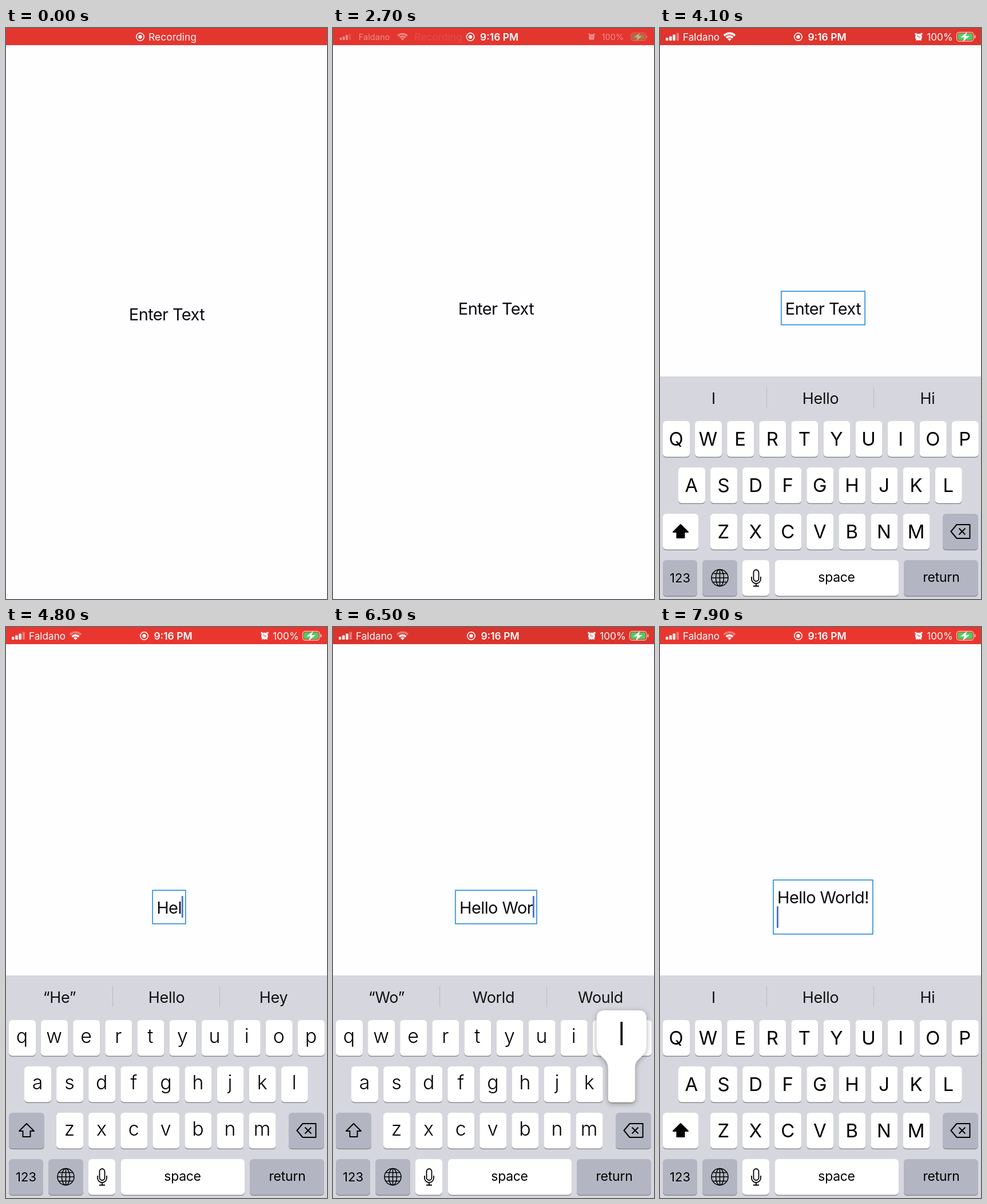
These frames come from a looping animation (561x998 px, 8 s). An HTML page with a canvas:

```html
<!DOCTYPE html>
<html lang="en">
<head>
<meta charset="utf-8">
<title>Text entry on a phone</title>
<style>
html, body { margin: 0; width: 100%; height: 100%; overflow: hidden; background: #fefdff; }
canvas { display: block; }
</style>
</head>
<body>
<canvas id="stage" width="561" height="998"></canvas>
<script>
const g = document.getElementById('stage').getContext('2d');
const LOOP = 8000, FAMILY = 'Inter, Roboto, sans-serif';
const GREY = '#b3b6c2';
const clamp = v => Math.max(0, Math.min(1, v));

// Drag path of the label: time, centre x, centre y
const path = [
  [200, 281, 500], [450, 300, 330], [650, 250, 200], [850, 130, 260],
  [1000, 90, 420], [1200, 150, 680], [1400, 363, 850], [1600, 345, 894],
  [1700, 316, 886], [1800, 305, 806], [2100, 290, 560], [2350, 285, 490]
];

// Key presses: time, key
const presses = [
  [4300, 'H'], [4500, 'e'], [4680, 'l'], [4830, 'l'], [4980, 'o'], [5120, ' '],
  [5750, 'W'], [6100, 'o'], [6280, 'r'], [6460, 'l'], [6660, 'd'],
  [7000, '123'], [7300, '!'], [7600, '\n']
];
const HOLD = 110, HINT_LAG = 150;
const KEYBOARD_AT = 3300;

const letters = ['qwertyuiop', 'asdfghjkl', 'zxcvbnm'];
const symbols = ['1234567890', '-/:;()$&@"', ".,?!'"];

function label(str, x, y, size, { align = 'center', weight = 400, spacing = 0, color = '#000' } = {}) {
  g.font = `${weight} ${size}px ${FAMILY}`;
  g.letterSpacing = spacing + 'px';
  g.textAlign = align;
  g.fillStyle = color;
  g.fillText(str, x, y);
  g.letterSpacing = '0px';
}

function line(points, close) {
  g.beginPath();
  points.forEach(([x, y]) => g.lineTo(x, y));
  if (close) g.closePath();
}

function circle(x, y, r) {
  g.beginPath();
  g.arc(x, y, r, 0, 7);
}

function box(x, y, w, h, r, color) {
  g.fillStyle = color;
  g.beginPath();
  g.roundRect(x, y, w, h, r);
  g.fill();
}

function pathAt(t) {
  const last = path.length - 1;
  if (t <= path[0][0]) return path[0].slice(1);
  if (t >= path[last][0]) return path[last].slice(1);
  const i = path.findIndex(p => p[0] > t) - 1;
  const slope = (k, a) => {
    if (k === 0 || k === last) return 0;
    const p = path[k - 1], q = path[k + 1];
    return (q[a] - p[a]) / (q[0] - p[0]);
  };
  const p = path[i], q = path[i + 1], d = q[0] - p[0], u = (t - p[0]) / d;
  return [1, 2].map(a => {
    const m = slope(i, a) * d, n = slope(i + 1, a) * d;
    return p[a] + u * (m + u * (3 * (q[a] - p[a]) - 2 * m - n + u * (2 * (p[a] - q[a]) + m + n)));
  });
}

function typedAt(t) {
  return presses.filter(([at, key]) => at + HOLD <= t && key !== '123').map(p => p[1]).join('');
}

function hints(typed) {
  if (!typed || /[!\n]$/.test(typed)) return ['I', 'Hello', 'Hi'];
  if (typed.endsWith(' ')) return ['Hello', 'Hi', 'There'];
  const word = typed.split(' ').pop();
  return [`“${word}”`, ...(word[0] === 'H' ? ['Hello', 'Hey'] : ['World', 'Would'])];
}

// Status bar
function recordMark(x) {
  g.strokeStyle = g.fillStyle = '#fff';
  g.lineWidth = 1.6;
  circle(x, 15.5, 6.7);
  g.stroke();
  circle(x, 15.5, 3.2);
  g.fill();
}

function signal() {
  [5, 7.5, 10.5, 13.5].forEach((h, i) =>
    box(10 + i * 6.2, 22 - h, 4.4, h, 1, i < 3 ? '#fff' : '#fff5'));
}

function wifi(weak) {
  [[15.3, 11.6], [10, 6.4], [4.8, 0]].forEach(([outer, inner], i) => {
    g.fillStyle = weak && i === 0 ? '#fff5' : '#fff';
    g.beginPath();
    g.arc(121.5, 22.8, outer, -2.36, -0.78);
    g.arc(121.5, 22.8, inner, -0.78, -2.36, true);
    g.fill();
  });
}

function alarm() {
  g.fillStyle = g.strokeStyle = '#fff';
  circle(452, 15.8, 6);
  g.fill();
  g.lineWidth = 1.6;
  [-1, 1].forEach(s => {
    circle(452 + s * 5, 10.2, 1.8);
    g.fill();
    line([[452 + s * 3, 19], [452 + s * 4.6, 21.8]]);
    g.stroke();
  });
  g.strokeStyle = '#e0372f';
  g.lineWidth = 1.1;
  line([[449.5, 13.2], [452, 16], [455, 16]]);
  g.stroke();
}

function battery() {
  g.strokeStyle = '#fffa';
  g.lineWidth = 1.3;
  g.beginPath();
  g.roundRect(518.5, 7.5, 29.5, 15.5, 4.5);
  g.stroke();
  box(549.5, 12.5, 2, 5.5, 1, '#fffa');
  box(520.5, 9.5, 25.5, 11.5, 2.5, '#46d160');
  g.fillStyle = '#fff';
  line([[537, 7], [525, 16.5], [532, 16.5], [529, 24], [541, 14], [534, 14]], true);
  g.fill();
}

function statusBar(t) {
  const glow = Math.cos((t - 5350) / 1000 * Math.PI);
  g.fillStyle = `rgb(${236 + 20 * glow}, ${55.5 + 3.5 * glow}, ${48 + 3 * glow})`;
  g.fillRect(0, 0, 561, 30);

  const u = clamp((t - 2500) / 400), p = 1 - (1 - u) ** 2.3;
  g.globalAlpha = clamp(1 - 1.76 * u);
  label('Recording', 249 - 134 * p, 22, 17.5, { align: 'left', color: '#fffffff0' });
  g.globalAlpha = 1;
  recordMark(234.5 + 7 * p);
  if (!u) return;

  g.globalAlpha = clamp(u * 2);
  label('9:16 PM', 285 + 7 * p, 22, 17.5, { weight: 600, color: '#fff' });
  const grow = (x, draw) => {
    const s = 0.25 + 0.75 * p;
    g.save();
    g.globalAlpha = u < 0.5 ? u * 0.85 : 0.425 + (u - 0.5) * 1.15;
    g.translate(x, 15.5);
    g.scale(s, s);
    g.translate(-x, -15.5);
    draw();
    g.restore();
  };
  grow(21.5, signal);
  grow(72, () => label('Faldano', 72, 22, 17.2, { color: '#fff' }));
  grow(121.5, () => wifi(t > 4700));
  grow(452, alarm);
  grow(489, () => label('100%', 489, 22, 17.2, { color: '#fff' }));
  grow(535, battery);
  g.globalAlpha = 1;
}

// Editable label
function field(t, typed) {
  const [x, y] = pathAt(t);
  const style = { align: 'left', spacing: -0.6, color: '#0c0c10' };
  const lines = (typed || 'Enter Text').split('\n');
  g.font = `400 29px ${FAMILY}`;
  g.letterSpacing = style.spacing + 'px';
  const w = g.measureText(lines[0]).width;
  const left = x - w / 2, shift = (lines.length - 1) * 18;
  label(lines[0], left, y + 11 - shift, 29, style);
  if (t < KEYBOARD_AT) return;

  g.strokeStyle = '#1484dc';
  g.lineWidth = 1.5;
  g.strokeRect(left - 7, 460.2 - shift, w + 14, 58.5 + 2 * shift);
  if (typed) box(shift ? left - 1 : left + w, 470 + shift, 2.8, 38, 1, '#456fd8');
}

// Keyboard
function key(x, y, w, color = '#fff') {
  box(x, y + 1.5, w, 62.5, 6, '#8a8b91');
  box(x, y, w, 62.5, 6, color);
}

function popup(x, w, y, ch, weight) {
  const c = x + w / 2, l = c - 43.5, r = c + 43.5, top = y - 98, bottom = y + 63;
  g.save();
  g.shadowColor = '#0005';
  g.shadowBlur = 10;
  g.shadowOffsetY = 2;
  g.fillStyle = '#fff';
  g.beginPath();
  g.moveTo(l + 12, top);
  g.arcTo(r, top, r, y - 36, 12);
  g.lineTo(r, y - 36);
  g.bezierCurveTo(r, y - 14, x + w, y - 18, x + w, y + 4);
  g.arcTo(x + w, bottom, x, bottom, 6);
  g.arcTo(x, bottom, x, y, 6);
  g.lineTo(x, y + 4);
  g.bezierCurveTo(x, y - 18, l, y - 14, l, y - 36);
  g.arcTo(l, top, r, top, 12);
  g.fill();
  g.restore();
  label(ch, c, y - 37, 56, { weight });
}

function shiftKey(caps) {
  key(5, 849, 62, caps ? '#fff' : GREY);
  g.fillStyle = g.strokeStyle = '#000';
  g.lineWidth = 2;
  g.lineJoin = 'round';
  line([[36, 868], [49, 881], [42.5, 881], [42.5, 891], [29.5, 891], [29.5, 881], [23, 881]], true);
  if (caps) g.fill();
  g.stroke();
}

function deleteKey() {
  key(494, 849, 62, GREY);
  g.strokeStyle = '#000';
  g.lineWidth = 2;
  line([[508.5, 880], [518.5, 868], [541.5, 868], [541.5, 892], [518.5, 892]], true);
  g.stroke();
  line([[522.5, 874.5], [533.5, 885.5]]);
  g.stroke();
  line([[533.5, 874.5], [522.5, 885.5]]);
  g.stroke();
}

function globe() {
  const x = 104.5, y = 961;
  g.strokeStyle = '#000';
  g.lineWidth = 1.5;
  [14.5, 7].forEach(r => {
    g.beginPath();
    g.ellipse(x, y, r, 14.5, 0, 0, 7);
    g.stroke();
  });
  [[-14.5, 0, 14.5, 0], [0, -14.5, 0, 14.5], [-12, -7.5, 12, -7.5], [-12, 7.5, 12, 7.5]].forEach(([a, b, c, d]) => {
    line([[x + a, y + b], [x + c, y + d]]);
    g.stroke();
  });
}

function mic() {
  g.strokeStyle = '#000';
  g.lineWidth = 1.8;
  g.beginPath();
  g.roundRect(163.5, 947, 9, 20, 4.5);
  g.stroke();
  g.beginPath();
  g.moveTo(160, 959);
  g.lineTo(160, 963);
  g.arc(168, 963, 8, Math.PI, 0, true);
  g.lineTo(176, 959);
  g.moveTo(168, 971);
  g.lineTo(168, 975);
  g.moveTo(163, 975.5);
  g.lineTo(173, 975.5);
  g.stroke();
}

function keyboard(t, typed) {
  const rise = 1 - (1 - clamp((t - KEYBOARD_AT) / 480)) ** 3;
  if (!rise) return;
  const pressed = (presses.find(([at]) => t >= at && t < at + HOLD) || [])[1];
  const numeric = t >= 7000 + HOLD && !typed.endsWith('\n');
  const caps = /^$|[ \n]$/.test(typed);
  const small = !caps && !numeric, weight = small ? 300 : 400;
  g.save();
  g.translate(0, (1 - rise) * 389);
  g.fillStyle = '#d6d7de';
  g.fillRect(0, 609, 561, 389);
  g.fillStyle = '#b9bac1';
  [186, 373].forEach(x => g.fillRect(x, 628, 1, 36));
  hints(typedAt(t - HINT_LAG)).forEach((h, i) =>
    label(h, 93.5 + 187 * i, 657, 27, { spacing: -0.3, color: '#111' }));

  let bubble;
  (numeric ? symbols : letters).forEach((row, r) => {
    const wide = numeric && r === 2, y = 687 + 81 * r;
    const start = r === 2 ? 88 : r === 1 && !numeric ? 32 : 5;
    const w = wide ? 70 : 47, pitch = wide ? 78.8 : 56.1;
    [...row].forEach((c, i) => {
      const ch = caps ? c.toUpperCase() : c, x = start + pitch * i;
      key(x, y, w);
      label(ch, x + w / 2 - 0.5, y + (small ? 39.5 : 43), small ? 34 : 33, { weight });
      if (ch === pressed) bubble = [x, w, y, ch, weight];
    });
  });

  if (numeric) {
    key(5, 849, 62, GREY);
    label('#+=', 36, 888, 21);
  } else shiftKey(caps);
  deleteKey();
  key(5, 930, 60, GREY);
  label(numeric ? 'ABC' : '123', 35, 969, 22);
  key(74, 930, 61, GREY);
  globe();
  key(144, 930, 47);
  mic();
  key(201, 930, 216, pressed === ' ' ? GREY : '#fff');
  label('space', 308.5, 968, 23, { spacing: -0.3 });
  key(426, 930, 130, pressed === '\n' ? '#fff' : GREY);
  label('return', 491.5, 968, 23, { spacing: -0.2 });
  if (bubble) popup(...bubble);
  g.restore();
}

function frame(now) {
  const t = now % LOOP, typed = typedAt(t);
  g.fillStyle = '#fefdff';
  g.fillRect(0, 0, 561, 998);
  field(t, typed);
  keyboard(t, typed);
  statusBar(t);
}

const begin = performance.now();
(function tick() {
  frame(performance.now() - begin);
  requestAnimationFrame(tick);
})();
</script>
</body>
</html>
```
